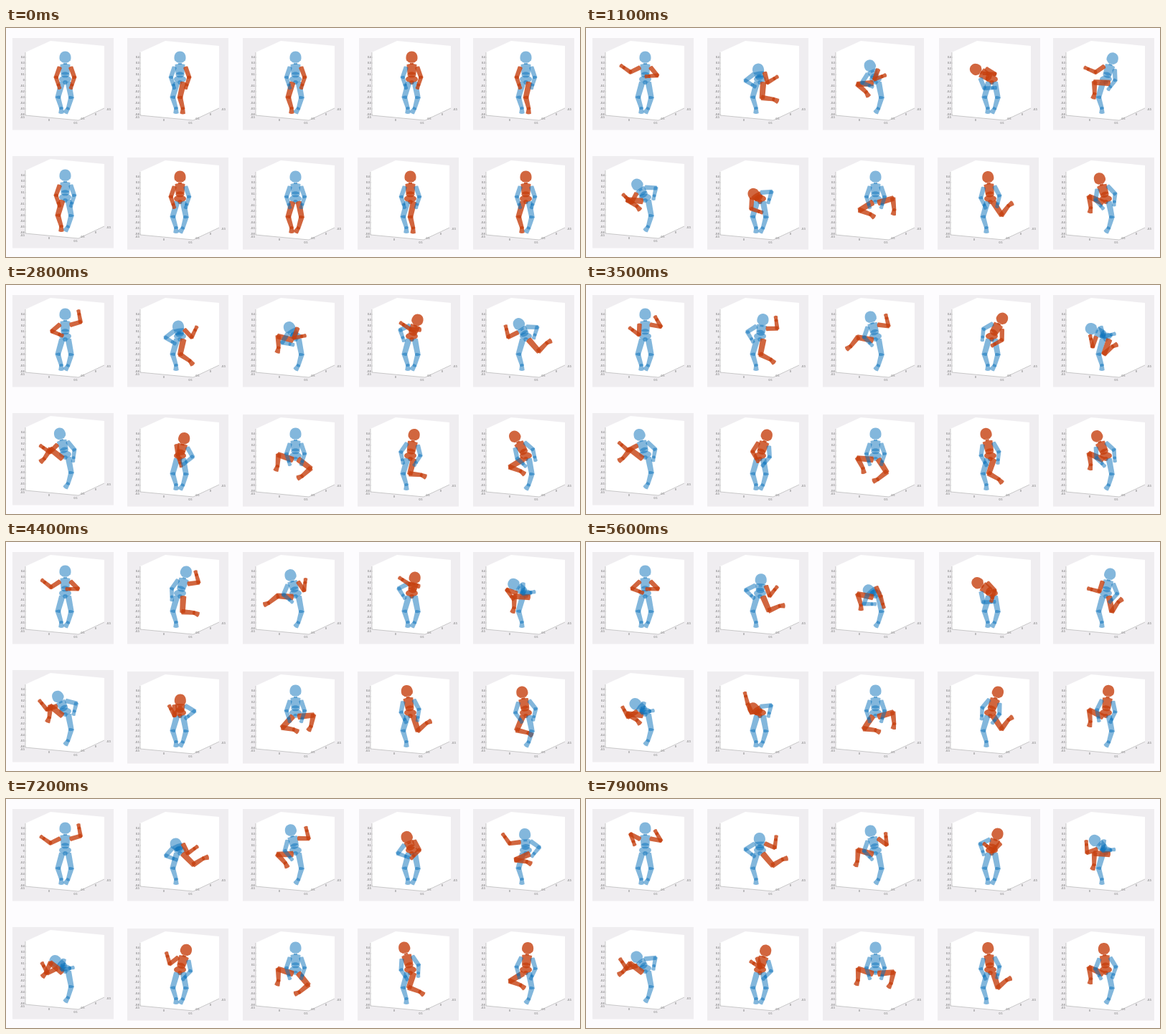
An HTML page for the animation above (8000 ms loop, 800x320 px).

```html
<!DOCTYPE html>
<html lang="en">
<head>
<meta charset="utf-8">
<title>Body part motion grid</title>
<style>
html, body { margin: 0; width: 100%; height: 100%; overflow: hidden; background: #fdfcfe; }
svg { display: block; width: 800px; height: 320px; }
text { font: 3.5px "Liberation Sans", Arial, sans-serif; fill: #555; }
.cool { fill: #0870ba; fill-opacity: .5; }
.hot { fill: #c5400f; fill-opacity: .8; }
</style>
</head>
<body>
<svg viewBox="0 0 800 320">
  <defs>
    <g id="axes">
      <path fill="#efedf0" d="M0 0H141V128.5H0Z"/>
      <path fill="#fff" d="M18 20L53 4L128 11V98L92 115L18 108Z"/>
      <path fill="none" stroke="#999" stroke-width=".5" d="M18 20V108L92 115L128 98"/>
    </g>
  </defs>
</svg>
<script>
const svg = document.querySelector('svg');
const axes = document.getElementById('axes');
const LOOP = 8000, STEP = 100, WARM_UP = .9;
const PELVIS = [73.5, 57];

// Standing pose: head centre, hands and ankles
const REST = {
  body: [73.5, 27],
  armL: [65.5, 70], armR: [81.5, 70],
  legL: [68, 98], legR: [77.5, 98.5]
};
const figures = [];

const mix = (a, b, s) => a.map((v, i) => v + (b[i] - v) * s);
const smooth = s => s * s * (3 - 2 * s);

// Harmonic motion between two points; period and time of arrival at "to" in seconds
function swing(from, to, period, peak) {
  return t => mix(from, to, .5 + .5 * Math.cos(2 * Math.PI * (t - peak) / period));
}

function label(x, y, value, anchor = 'middle') {
  return `<text x="${x}" y="${y}" text-anchor="${anchor}">${value}</text>`;
}
let labels = '';
for (let i = 0; i < 11; i++) {
  labels += label(16.8, 28.2 + 8 * i, (4 - i) / 10, 'end')
    + `<path d="M18 ${27 + 8 * i}h1" stroke="#999" stroke-width=".4"/>`;
}
for (let i = 0; i < 3; i++) {
  labels += label(14 + 37 * i, 111.6 + 4 * i, (i - 1) / 2)
    + label(98 + 18 * i, 114.3 - 6.5 * i, (1 - i) / 2);
}
axes.innerHTML += labels;

function figure(x, y, bodyTone, moves) {
  const frame = document.createElementNS(svg.namespaceURI, 'g');
  frame.setAttribute('transform', `translate(${x} ${y})`);
  frame.innerHTML = '<use href="#axes"/><g></g>';
  svg.append(frame);
  figures.push({ layer: frame.lastChild, bodyTone, moves });
}

figure(9, 14, 'cool', {
  armL: swing([39, 38], [70, 57], 2.9, 5.6),
  armR: swing([92, 22], [72, 58], 4.4, 5)
});
figure(169, 14, 'cool', {
  body: swing([67, 50], [82, 28], 4.9, 4.4),
  armR: swing([98, 59], [95, 26], 4.8, 4.1),
  legR: swing([87, 92], [106, 69], 9, 7.2)
});
figure(330, 14, 'cool', {
  body: swing([64, 54], [67, 28], 3.6, 3.9),
  armR: swing([86, 80], [88, 24], 3.6, 3.8),
  legL: swing([63, 76], [35, 71], 5, 4.1)
});
figure(492, 14, 'hot', {
  body: swing([51, 44], [88, 33], 5.1, 3.5),
  armR: swing([74, 71], [56, 35], 1.9, 4.5)
});
figure(651, 14, 'cool', {
  body: swing([52, 48], [84, 28], 4.8, 6.2),
  armL: swing([56, 66], [41, 34], 5, 6.9),
  legR: swing([57, 78], [103, 67], 3.5, 6.2)
});
figure(9, 179, 'cool', {
  body: swing([66, 29], [59, 50], 7, 6.4),
  armL: swing([37, 41], [43, 54], 5, 6.3),
  legL: swing([42, 63], [62, 70], 4.6, 5.6)
});
figure(169, 181, 'hot', {
  body: swing([64, 52], [83, 29], 4.1, 7.5),
  armL: swing([79, 82], [51, 27], 8.5, 6.2)
});
figure(330, 181, 'cool', {
  legL: swing([48, 72], [76, 83], 5, 5.1),
  legR: swing([76, 91], [105, 69], 3.5, 5.1)
});
figure(490, 181, 'hot', {
  body: swing([65, 27], [84, 29], 3.4, 5.6),
  legR: swing([85, 91], [102, 62], 3.5, 5.1)
});
figure(651, 181, 'hot', {
  body: swing([58, 31], [79, 27], 7.5, 6.3),
  legL: swing([52, 70], [77, 86], 2.2, 4.5)
});

const shape = (tone, d, place) => `<path class="${tone}" d="${d}" transform="${place}"/>`;
const ellipse = (tone, x, y, rx, ry, turn = 0) =>
  `<ellipse class="${tone}" cx="${x}" cy="${y}" rx="${rx}" ry="${ry}" transform="rotate(${turn} ${x} ${y})"/>`;

// Tapered block between two joints, reaching a little past both
function bone(tone, [ax, ay], [bx, by], wa, wb) {
  const turn = Math.atan2(by - ay, bx - ax) * 180 / Math.PI;
  const a = wa / 2, b = wb / 2, end = Math.hypot(bx - ax, by - ay) + 1;
  return shape(tone, `M-1 ${-a}L${end} ${-b}Q${end + 2} 0 ${end} ${b}L-1 ${a}Q-3 0 -1 ${-a}Z`,
    `translate(${ax} ${ay}) rotate(${turn})`);
}

// Two-bone reach: the middle joint and the end that the limb can really get to
function reach([x, y], [tx, ty], upper, lower, bend) {
  const wanted = Math.hypot(tx - x, ty - y);
  const dist = Math.max(lower * .45, Math.min(upper + lower - .1, wanted));
  const aim = Math.atan2(ty - y, tx - x);
  const open = Math.acos((upper * upper + dist * dist - lower * lower) / (2 * upper * dist));
  return [
    [x + upper * Math.cos(aim + bend * open), y + upper * Math.sin(aim + bend * open)],
    [x + dist * Math.cos(aim), y + dist * Math.sin(aim)]
  ];
}

// Elbows point down and away from the body
function arm(tone, shoulder, target, side) {
  const drop = ([[x, y]]) => y + side * x;
  const [elbow, hand] = [1, -1].map(bend => reach(shoulder, target, 14, 16, bend))
    .sort((a, b) => drop(b) - drop(a))[0];
  const wrist = mix(elbow, hand, .7);
  return bone(tone, shoulder, elbow, 6.5, 6)
    + bone(tone, elbow, wrist, 6, 5)
    + bone(tone, wrist, hand, 4.5, 5.5);
}

function leg(tone, hip, target, bend) {
  const [knee, ankle] = reach(hip, target, 20.5, 16, bend);
  const aim = Math.atan2(ankle[1] - knee[1], ankle[0] - knee[0]) + .3;
  const toe = [ankle[0] + 6 * Math.cos(aim), ankle[1] + 6 * Math.sin(aim)];
  return bone(tone, hip, knee, 8.5, 7.5)
    + bone(tone, knee, ankle, 7.5, 5.5)
    + bone(tone, ankle, toe, 5, 7.5);
}

function drawFigure({ bodyTone, moves }, t) {
  const warm = smooth(Math.min(1, t / WARM_UP));
  const place = name => moves[name] ? mix(REST[name], moves[name](t), warm) : REST[name];
  const tone = name => moves[name] ? 'hot' : 'cool';

  const [px, py] = PELVIS, [hx, hy] = place('body');
  const dx = hx - px, dy = hy - py, stretch = Math.hypot(dx, dy);
  const angle = Math.atan2(dx, -dy) * Math.min(1, stretch / 18);
  const turn = angle * 180 / Math.PI;
  const squash = Math.max(.6, Math.min(1, stretch / 30));
  const [cx, cy] = mix(PELVIS, [hx, hy], .43);
  const sin = Math.sin(angle), cos = Math.cos(angle);
  const onChest = (x, y) => [cx + x * cos - y * squash * sin, cy + x * sin + y * squash * cos];
  const atHead = `translate(${hx} ${hy}) rotate(${turn})`;

  let out = ellipse(bodyTone, px, py + .5, 8.5, 5)
    + ellipse(bodyTone, px, py + 5, 3.2, 3)
    + ellipse(bodyTone, px + dx * .19, py + dy * .19, 6, 4, turn)
    + shape(bodyTone, 'M-7 -7Q0 -9 7 -7L6 6Q0 9 -6 6Z', `translate(${cx} ${cy}) rotate(${turn}) scale(1 ${squash})`)
    + shape(bodyTone, 'M-2.5 7.5H2.5V10H-2.5Z', atHead)
    + shape(bodyTone, 'M-8 2C-8.5 -4 -5.5 -8.5 0 -8.5S8.5 -4 8 2L7.3 4.2L4 7.3H-4L-7.3 4.2Z', atHead);

  for (const [name, side] of [['L', -1], ['R', 1]]) {
    const armName = 'arm' + name, legName = 'leg' + name;
    const mirrored = side > 0 && (moves.legL || !moves.legR);
    const hand = moves[armName] ? place(armName) : onChest(8 * side, 26);
    out += leg(tone(legName), [px + 4.5 * side, py + 6], place(legName), mirrored ? -1 : 1)
      + arm(tone(armName), onChest(8 * side, -2.5), hand, side);
  }
  return out;
}

let shown = -1;
function tick() {
  const t = Math.floor(performance.now() % LOOP / STEP) * STEP;
  if (t !== shown) {
    shown = t;
    for (const f of figures) f.layer.innerHTML = drawFigure(f, t / 1000);
  }
  requestAnimationFrame(tick);
}
tick();
</script>
</body>
</html>
```
